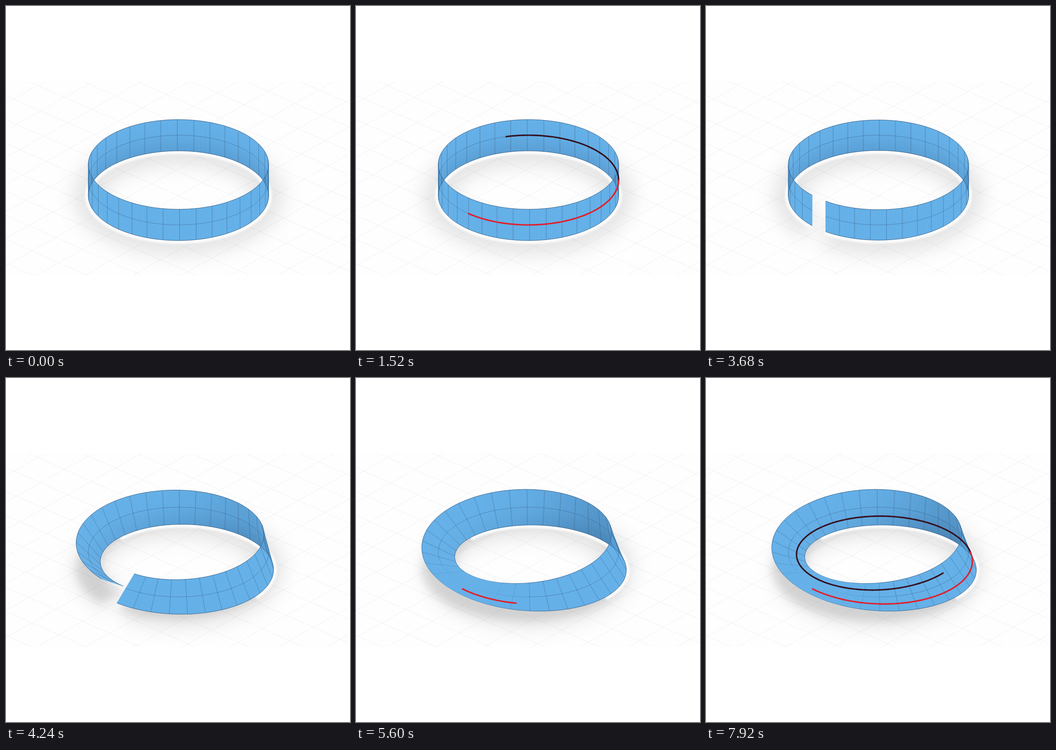
These frames come from a looping animation (748x748 px, 8000 ms). An HTML page with a canvas:

```html
<!DOCTYPE html>
<html lang="en">
<head>
<meta charset="utf-8">
<title>Band to Möbius strip</title>
<style>
  html, body { margin: 0; width: 100%; height: 100%; overflow: hidden; background: #fff; }
  canvas { display: block; width: 748px; height: 748px; }
</style>
</head>
<body>
<canvas id="stage" width="748" height="748"></canvas>
<script>
const ctx = document.getElementById('stage').getContext('2d');
const LOOP = 8000, STEP = 80;
const CX = 375, CY = 378.5, R = 196, HALF = 39.26;
const TILT = 0.4975, RISE = 0.866;
const SEAM = -41.6, TILES = 34, SUB = 6, CELLS = TILES * SUB;
const BASE = [100, 176, 232];
const rad = d => d * Math.PI / 180;
const clamp = (v, a = 0, b = 1) => Math.min(b, Math.max(a, v));
const ease = (t, a, b) => {
  const k = clamp((t - a) / (b - a));
  return k * k * (3 - 2 * k);
};

// Shape of the band at the current time
let gap = 0, twist = 0, half = HALF;

function pose(t) {
  const open = ease(t, 3120, 3600) - ease(t, 4640, 5120);
  gap = 11.4 * open;
  twist = ease(t, 3680, 4640);
  half = HALF - open * (1 - twist);
}

const phi = u => SEAM + gap / 2 + u * (360 - gap);
const lean = u => twist * (180 * u - 90);

function project(angle, r, z) {
  const a = rad(angle);
  return [CX + r * Math.sin(a), CY + TILT * r * Math.cos(a) - RISE * z];
}

// u runs along the band, s across it from -1 to 1
function point(u, s, onFloor) {
  const q = rad(lean(u));
  return project(phi(u), R + s * half * Math.sin(q), onFloor ? -HALF : s * half * Math.cos(q));
}

function facesFront(u, s = 0) {
  const p = point(u, s), n = point(u + 0.001, s);
  const a = point(u, -1), b = point(u, 1);
  return (n[0] - p[0]) * (b[1] - a[1]) - (n[1] - p[1]) * (b[0] - a[0]) < 0;
}

function addQuad(path, u, v, onFloor) {
  path.moveTo(...point(u, -1, onFloor));
  path.lineTo(...point(v, -1, onFloor));
  path.lineTo(...point(v, 1, onFloor));
  path.lineTo(...point(u, 1, onFloor));
  path.closePath();
}

function curve(s, from = 0, to = 1, onFloor = false) {
  const path = new Path2D();
  for (let i = 0; i <= CELLS; i++) path.lineTo(...point(from + (to - from) * i / CELLS, s, onFloor));
  return path;
}

function stroke(path, color, width) {
  ctx.strokeStyle = color;
  ctx.lineWidth = width;
  ctx.stroke(path);
}

function drawFloor() {
  ctx.fillStyle = '#fff';
  ctx.fillRect(0, 0, 748, 748);
  ctx.save();
  ctx.beginPath();
  ctx.rect(0, 164, 748, 421);
  ctx.clip();
  ctx.fillStyle = '#fefefe';
  ctx.fillRect(0, 164, 748, 421);
  const grid = new Path2D(), unit = 78.4;
  const a = rad(SEAM), ax = [Math.sin(a), Math.cos(a)], bx = [-ax[1], ax[0]];
  const at = (i, j) => [CX + unit * (i * ax[0] + j * bx[0]), CY + 34 + TILT * unit * (i * ax[1] + j * bx[1])];
  for (let i = -9; i <= 9; i++) {
    grid.moveTo(...at(i, -10));
    grid.lineTo(...at(i, 10));
    grid.moveTo(...at(-10, i));
    grid.lineTo(...at(10, i));
  }
  stroke(grid, '#f1f1f1', 1);

  const shade = new Path2D();
  for (let i = 0; i < CELLS; i++) addQuad(shade, i / CELLS, (i + 1) / CELLS, true);
  ctx.filter = 'blur(20px)';
  stroke(curve(0, 0, 1, true), 'rgba(0,0,0,.10)', 62);
  ctx.filter = 'blur(9px)';
  ctx.fillStyle = 'rgba(0,0,0,.09)';
  ctx.fill(shade);
  // Light rim where the band stands on the floor
  const reach = 0.5 - 0.25 * clamp(twist * 2);
  ctx.filter = 'blur(2px)';
  stroke(curve(-1, 0.5 - reach, 0.5 + reach), 'rgba(255,255,255,.95)', 14);
  ctx.restore();
}

function tone(dark) {
  return `rgb(${BASE.map((c, i) => Math.round(c * (1 - dark * (1 - i * 0.12)))).join()})`;
}

function drawBand() {
  const front = new Path2D(), back = new Path2D(), cells = [];
  for (let i = 0; i < CELLS; i++) {
    const u = i / CELLS, v = (i + 1) / CELLS, mid = (u + v) / 2;
    const isFront = facesFront(mid), cell = new Path2D();
    addQuad(cell, u, v);
    addQuad(isFront ? front : back, u, v);
    cells.push({ cell, mid, isFront });
  }
  cells.sort((a, b) => a.isFront - b.isFront);
  ctx.lineJoin = 'round';
  for (const { cell, mid, isFront } of cells) {
    let paint = tone(0);
    if (!isFront) {
      const fold = twist * 0.17 * Math.exp(-(((phi(mid) - 122) / 42) ** 2));
      const low = 0.11 * Math.cos(rad(lean(mid))) ** 4;
      paint = ctx.createLinearGradient(...point(mid, 1), ...point(mid, -1));
      paint.addColorStop(0, tone(fold));
      paint.addColorStop(0.45, tone(fold + low * 0.15));
      paint.addColorStop(1, tone(fold + low));
    }
    ctx.fillStyle = paint;
    ctx.fill(cell);
    stroke(cell, paint, 0.6);
  }
  ctx.save();
  ctx.clip(front);
  ctx.fillStyle = 'rgba(40,85,130,.2)';
  ctx.fill(back);
  ctx.restore();
}

function drawMesh() {
  const ink = a => `rgba(50,78,112,${a})`;
  const fade = u => clamp((86 - Math.abs(lean(u))) / 22);
  ctx.lineCap = 'butt';
  for (let k = gap > 0.01 ? 1 : 0; k < TILES; k++) {
    const u = k / TILES, line = new Path2D();
    line.moveTo(...point(u, -1));
    line.lineTo(...point(u, 1));
    stroke(line, ink(0.48 * fade(u)), 0.9);
  }
  for (let i = 0; i < TILES; i++) {
    const u = i / TILES, v = (i + 1) / TILES, f = fade((u + v) / 2);
    for (const s of [-1, 0, 1]) {
      const line = new Path2D();
      for (let j = 0; j <= SUB; j++) line.lineTo(...point(u + (v - u) * j / SUB, s));
      stroke(line, ink(s ? 0.3 + 0.45 * f : 0.48 * f), s ? 1 : 0.9);
    }
  }
}

// The trace lies on one side; seen through the band it looks dark
function drawTrace(end, s, alpha) {
  if (end <= 0 || alpha <= 0) return;
  const red = new Path2D(), dark = new Path2D();
  const n = Math.max(1, Math.ceil(end * 240));
  let last = null;
  for (let i = 0; i < n; i++) {
    const u = end * i / n, v = end * (i + 1) / n;
    const path = facesFront((u + v) / 2, s) ? red : dark;
    if (path !== last) path.moveTo(...point(u, s));
    path.lineTo(...point(v, s));
    last = path;
  }
  ctx.save();
  ctx.globalAlpha = alpha;
  ctx.lineCap = ctx.lineJoin = 'round';
  const width = 2 + 1.2 * alpha;
  stroke(dark, '#35101f', width);
  stroke(red, '#e21f2b', width);
  ctx.restore();
}

function draw(t) {
  pose(t);
  drawFloor();
  drawBand();
  drawMesh();
  const speed = 0.18 / 360;
  if (t < 3000) drawTrace(clamp((t - 209) * speed), 0, 1 - ease(t, 2540, 2900));
  else drawTrace(clamp((t - 5409) * speed, 0, 2), -0.5, 1);
}

const start = performance.now();
function tick(now) {
  const t = Math.max(0, now - start) % LOOP;
  draw(Math.floor(t / STEP) * STEP);
  requestAnimationFrame(tick);
}
draw(0);
requestAnimationFrame(tick);
</script>
</body>
</html>
```
